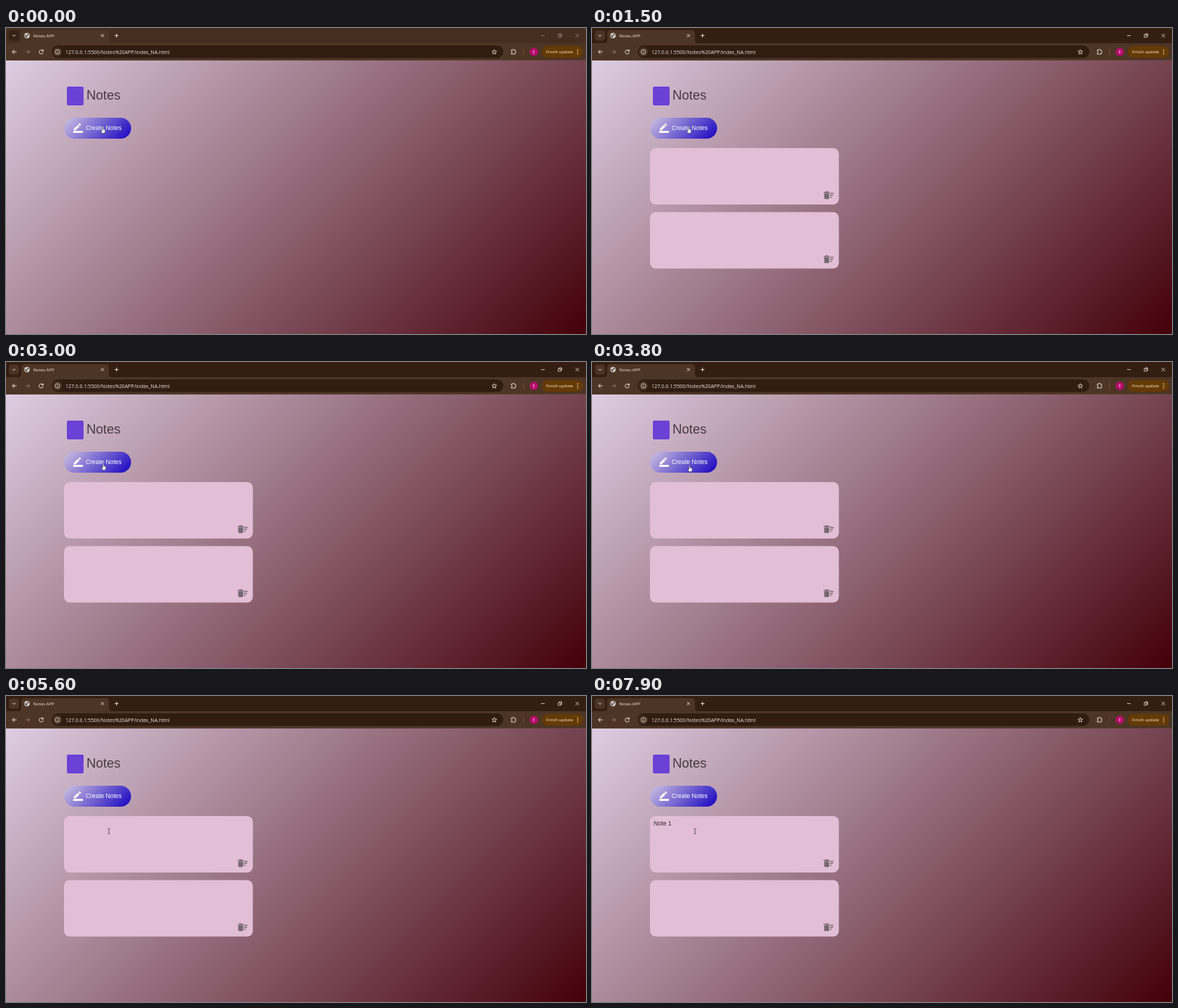
Write an HTML page with a canvas that moves like this. It is 800x423 px and loops after 8000 ms.

```html
<!DOCTYPE html>
<html lang="en">
<head>
<meta charset="utf-8">
<title>Notes APP</title>
<style>
html, body { margin: 0; width: 100%; height: 100%; overflow: hidden; background: #43000a; }
canvas { display: block; width: 800px; height: 423px; }
</style>
</head>
<body>
<canvas id="stage"></canvas>
<script>
const W = 800, H = 423, LOOP = 8000, TICK = 100;
const UI = '"Open Sans", "Noto Sans", sans-serif';
const ARIAL = '"Liberation Sans", Arial, sans-serif';
const canvas = document.getElementById('stage');
const ctx = canvas.getContext('2d');
const dpr = window.devicePixelRatio || 1;
canvas.width = W * dpr;
canvas.height = H * dpr;
ctx.scale(dpr, dpr);

// when each thing happens, in ms
const ACTIVE_AT = 100, CARDS_AT = [400, 1300], CLICK_AT = 5000;
const KEYS = [[6100, 'N'], [6300, 'o'], [6500, 't'], [6800, 'e'], [7000, ' '], [7200, '1']];
const POINTER = [[0, 134, 141], [2500, 134, 141], [2900, 135, 145], [3700, 135, 145], [4400, 142, 187]];

function rect(x, y, w, h, color, r = 0) {
  ctx.fillStyle = color;
  ctx.beginPath();
  ctx.roundRect(x, y, w, h, r);
  ctx.fill();
}

function circle(x, y, r, color) {
  ctx.fillStyle = color;
  ctx.beginPath();
  ctx.arc(x, y, r, 0, 7);
  ctx.fill();
}

function text(str, x, y, size, color, font = UI, align = 'left') {
  ctx.font = `${size}px ${font}`;
  ctx.fillStyle = color;
  ctx.textAlign = align;
  ctx.fillText(str, x, y);
}

function path(d, x, y, scale, fill, stroke, width = 1) {
  const p = new Path2D(d);
  ctx.save();
  ctx.translate(x, y);
  ctx.scale(scale, scale);
  if (fill) { ctx.fillStyle = fill; ctx.fill(p); }
  if (stroke) { ctx.strokeStyle = stroke; ctx.lineWidth = width; ctx.stroke(p); }
  ctx.restore();
}

const line = (d, x, y, color, width = 1) => path(d, x, y, 1, null, color, width);

// CSS-like 135deg gradient over a box
function diagonal(x, y, w, h, from, to) {
  const cx = x + w / 2, cy = y + h / 2, d = (w + h) / 4;
  const g = ctx.createLinearGradient(cx - d, cy - d, cx + d, cy + d);
  g.addColorStop(0, from);
  g.addColorStop(1, to);
  return g;
}

function titleBar(active) {
  rect(0, 0, W, 22, active ? '#341e12' : '#452e20');
  rect(4, 3.5, 14, 14, active ? '#4b3424' : '#352116', 4);
  line('M-2 -1L0 1L2 -1', 11, 10.5, '#f0e4dc');
  path('M17 21Q21 21 21 17V8Q21 3 26 3H137Q142 3 142 8V17Q142 21 146 21Z', 0, 0, 1, '#4d3525');
  circle(29, 10.5, 3.7, '#d9d5d3');
  path('M-2.8 -1L-.2 0L.6 1.5L-.8 3L-2.4 1.6ZM.2 -3L2.8 -1.6L1.6 .2L0 -1Z', 29, 10.5, 1, '#5b4a40');
  text('Notes APP', 37.5, 12.7, 6, '#f3e8e0');
  line('M-2 -2L2 2M2 -2L-2 2', 133, 10.5, '#f0e4dc', .9);
  line('M-2.6 0H2.6M0 -2.6V2.6', 152.5, 10.5, '#f0e4dc', .9);
  const ctl = active ? '#eadfd8' : '#9a877b';
  line('M-2.5 0H2.5', 740.5, 10.5, ctl, .8);
  line('M-2.3 -1H1.2V2.5H-2.3ZM-1 -1V-2.3H2.5V1.2H1.2', 764, 10.3, ctl, .8);
  line('M-2.4 -2.4L2.4 2.4M2.4 -2.4L-2.4 2.4', 788, 10.5, ctl, .8);
}

function toolbar() {
  rect(0, 21, W, 24, '#4d3525');
  rect(0, 44.4, W, .6, '#6a5346');
  line('M3 0H-2.6M0 -2.8L-2.8 0L0 2.8', 11.5, 33, '#f0e4dc');
  line('M-3 0H2.6M0 -2.8L2.8 0L0 2.8', 30, 33, '#8b7567');
  line('M2.4 -1.5A2.8 2.8 0 1 0 2.8 .8M2.8 -3.2V-1H.6', 48.5, 33, '#f0e4dc');
  rect(63, 24, 623, 17.5, '#301c11', 8.75);
  circle(71, 33, 6.2, '#4a3223');
  line('M3.2 0A3.2 3.2 0 1 1 -3.2 0A3.2 3.2 0 1 1 3.2 0M0 -.3V1.8M0 -1.8V-1', 71, 33, '#eadfd8', .8);
  text('127.0.0.1:5500/Notes%20APP/index_NA.html', 82, 35.5, 6.9, '#eee5df');
  line('M0 -3.2L.9 -1L3.2 -.8L1.4 .7L2 3L0 1.8L-2 3L-1.4 .7L-3.2 -.8L-.9 -1Z', 673.5, 33, '#e8dbd2', .9);
  line('M-3 -2.2H-1.2A1.1 1.1 0 0 1 1 -2.2H2.4V-.5A1.1 1.1 0 0 1 2.4 1.7V3.4H-3V1.8A1.2 1.2 0 0 0 -3 -.6Z', 700, 32.6, '#f0e4dc', .9);
  rect(713.5, 29, .8, 8, '#75543b');
  circle(728, 33, 5.8, '#b70d6d');
  text('E', 728, 35, 5.5, '#ffeaf5', UI, 'center');
  rect(739, 25, 57, 16, '#643a04', 8);
  text('Finish update', 745, 35.2, 5.9, '#ffe6cb');
  for (const y of [30.2, 33, 35.8]) circle(788.5, y, .8, '#ffe6cb');
}

function page() {
  rect(0, 45, W, 378, diagonal(0, 45, W, 378, '#decde2', '#430009'));
  rect(84, 81, 23, 26, '#6a42d6', 2);
  text('Notes', 111, 99, 18, '#443a40', ARIAL);
  rect(80, 124, 92.5, 29, diagonal(80, 124, 92.5, 29, '#cfc3e0', '#1602c0'), 14.5);
  rect(92.7, 142.3, 13.4, 2.6, '#fff');
  path('M0 8.2L6.7 1.5L9.3 4.1L2.6 10.8H0ZM7.4 .8L8.7 -.5Q9.2 -1 9.7 -.5L11.3 1.1Q11.8 1.6 11.3 2.1L10 3.4Z',
    93.6, 132.4, .85, '#fff');
  text('Create Notes', 110, 141.3, 8.4, '#fff', ARIAL);
}

function card(y) {
  rect(80, y, 260.5, 78, '#e2bfd6', 8);
  const ink = '#77686f';
  rect(319.6, y + 60.6, 8.2, 1.4, ink);
  rect(322, y + 59.8, 3.4, 1.4, ink);
  rect(320.3, y + 62.6, 6.8, 7.8, ink, [0, 0, 1.3, 1.3]);
  [5, 4.3, 2.4].forEach((w, i) => rect(328.2, y + 61.9 + i * 2.7, w, 1.4, ink));
}

function typing(t) {
  const done = KEYS.filter(k => t >= k[0]);
  const str = done.map(k => k[1]).join('');
  text(str, 85, 178.6, 8.4, '#33272e', ARIAL);
  const last = done.length ? done[done.length - 1][0] : CLICK_AT;
  if (t >= CLICK_AT && (t - last) % 1060 < 530) {
    rect(85 + ctx.measureText(str).width, 171, .8, 9.3, '#33272e');
  }
}

function pointerAt(t) {
  let i = POINTER.length - 1;
  while (POINTER[i][0] > t) i--;
  const a = POINTER[i], b = POINTER[i + 1] || a;
  const k = a === b ? 0 : (t - a[0]) / (b[0] - a[0]);
  const s = k * k * (3 - 2 * k);
  return [a[1] + (b[1] - a[1]) * s, a[2] + (b[2] - a[2]) * s];
}

function pointer(t) {
  const [x, y] = pointerAt(t);
  if (y < 153) {
    path('M-1.6 -4Q-.8 -4.8 0 -4V-1.2L2.2 -.7Q3 -.4 2.9 .5L2.3 4.4H-1.5L-3.4 1.2Q-3 .2 -1.6 1.2Z',
      x, y, 1, '#fff', '#292240', .6);
  } else if (y < 166) {
    path('M0 0V8L1.9 6.3L3.1 9L4.3 8.5L3.1 5.8H5.6Z', x - 2, y - 4, 1, '#fff', '#222', .5);
  } else {
    line('M-1.6 -3.4H-.5L0 -3L.5 -3.4H1.6M0 -3V3M-1.6 3.4H-.5L0 3L.5 3.4H1.6', x, y, '#4a4048', .8);
  }
}

function draw(now) {
  const t = Math.floor((now % LOOP) / TICK) * TICK;
  page();
  titleBar(t >= ACTIVE_AT);
  toolbar();
  CARDS_AT.forEach((at, i) => { if (t >= at) card(166 + i * 88.5); });
  typing(t);
  pointer(t);
}

const start = performance.now();
function loop() {
  draw(performance.now() - start);
  requestAnimationFrame(loop);
}
loop();
</script>
</body>
</html>
```
